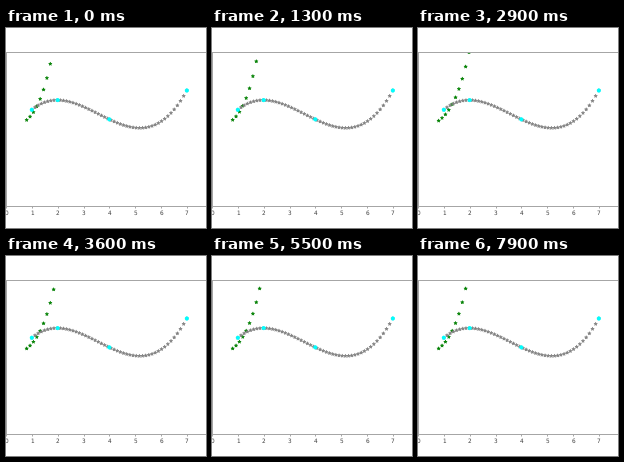
A matplotlib script that plays this animation: 200x200 px, repeating every 8000 ms.

```python
import numpy as np
import matplotlib.pyplot as plt
from matplotlib.animation import FuncAnimation

S = 5 / 12  # scale of all point sizes
FRAMES, STEP = 80, 100
LINE, INK = "0.65", "0.25"

plt.rcParams.update({
    "font.family": "DejaVu Sans",
    "font.size": 10 * S,
    "axes.linewidth": 0.72,
    "axes.edgecolor": LINE,
    "xtick.color": LINE,
    "xtick.labelcolor": INK,
    "xtick.major.size": 3.5 * S,
    "xtick.major.width": 0.72,
    "xtick.major.pad": 4 * S,
    "text.hinting": "none",
})

knots_x = np.array([1, 2, 4, 7])
knots_y = np.array([2, 3, 1, 4])
cubic = np.polyfit(knots_x, knots_y, 3)
curve_x = np.linspace(1, 7, 50)
fit_x = np.linspace(0.8, 7.2, 50)

# seconds, and where the fit falls back through zero
ROOT_T = [0, 1.3, 2.3, 2.7, 3.6, 4.6, 6.3, 6.4, 7.9]
ROOT_X = [4.785, 5.176, 4.568, 5.437, 5.437, 6.612, 6.612, 6.94, 7.41]


def fit(x, t):
    swing = np.exp(-(t / 2.6)**2) * np.cos(2 * np.pi * (1.63 * t - 0.14))
    gain = 0.361 + 0.209 * swing
    root = np.interp(t, ROOT_T, ROOT_X)

    def rise(v):
        return 0.22 + 0.8 * v**2 + gain * v**4

    return rise(x) - rise(root) * (x / root)**8


def dots(x, y, marker, color):
    # one size per point keeps positions finer than whole pixels
    sizes = np.full(len(x), (6 * S)**2)
    return ax.scatter(x, y, sizes, color, marker, linewidths=S, snap=False)


fig = plt.figure(figsize=(2, 2), dpi=100, facecolor="white")
ax = fig.add_axes([0, 0.11, 0.775 * 4 / 3, 0.77])

stars = dots(fit_x, fit(fit_x, 0), "*", "green")
dots(curve_x, np.polyval(cubic, curve_x), "*", "gray")
dots(knots_x, knots_y, "o", "cyan")
ax.set(xlim=(0, 8), ylim=(-8, 8), xticks=range(9), yticks=[])


def update(i):
    t = i * STEP / 1000
    stars.set_offsets(np.column_stack([fit_x, fit(fit_x, t)]))
    return stars,


anim = FuncAnimation(fig, update, frames=FRAMES, interval=STEP,
                     repeat=True, repeat_delay=0)
plt.show()
```
